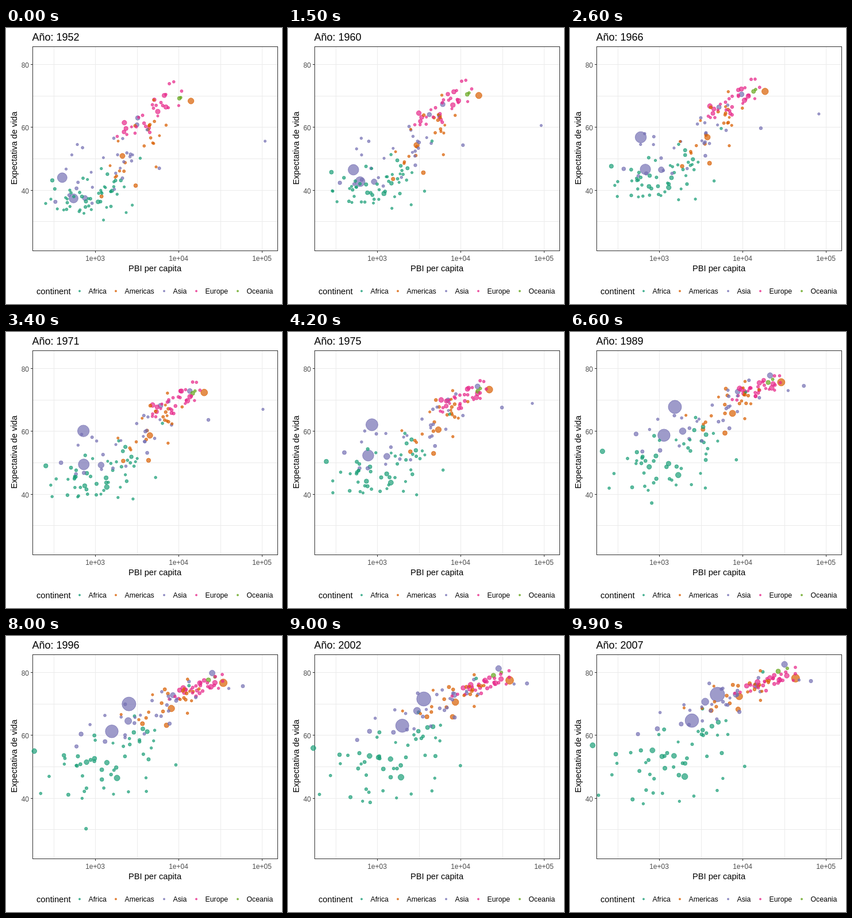
Recreate the animation shown at these times as an HTML page with a canvas. Size 480 by 480 pixels, loop 10 s.

```html
<!DOCTYPE html>
<html lang="es">
<head>
<meta charset="utf-8">
<title>PBI per capita y expectativa de vida</title>
<style>
html, body { margin: 0; width: 100%; height: 100%; overflow: hidden; background: #fff; }
svg, canvas { position: absolute; left: 0; top: 0; width: 480px; height: 480px; }
text { font-family: "Liberation Sans", Arial, sans-serif; font-size: 14.67px; }
.tick { font-size: 12px; fill: #4d4d4d; }
.key { font-size: 12.3px; }
</style>
</head>
<body>
<svg id="chart" viewBox="0 0 480 480">
  <text id="title" x="45.5" y="22" style="font-size:18px">Año: 1952</text>
  <text x="259" y="423" text-anchor="middle">PBI per capita</text>
  <text transform="translate(19 209) rotate(-90)" text-anchor="middle">Expectativa de vida</text>
  <text x="53" y="463">continent</text>
</svg>
<canvas id="dots" width="480" height="480"></canvas>
<script>
const LOOP = 10000, STEP = 100, STEPS_PER_SURVEY = 9, LAST = 11;
const ERAS = [0, 6, LAST]; // five-year surveys: 1952, 1982, 2007

// Each era: mean and spread of log10(PBI), mean life, years per decade of PBI, life noise.
const CONTINENTS = {
  Africa: { color: "#1b9e77", n: 50, growth: 3.9, keyX: 128,
    eras: [[2.97, 0.27, 39, 4, 4], [3.15, 0.36, 51.5, 9, 5], [3.2, 0.43, 54.5, 9, 7]] },
  Americas: { color: "#d95f02", n: 23, growth: 2.4, keyX: 191,
    eras: [[3.48, 0.22, 53, 24, 6], [3.78, 0.22, 66, 15, 4], [3.92, 0.28, 73.2, 9, 2.5]] },
  Asia: { color: "#7570b3", n: 27, growth: 2.7, keyX: 275,
    eras: [[3.15, 0.36, 46, 12, 7], [3.55, 0.5, 61, 13, 5], [3.75, 0.52, 70, 10, 3.2]] },
  Europe: { color: "#e7298a", n: 30, growth: 1.35, keyX: 331,
    eras: [[3.68, 0.24, 64.8, 20, 2.5], [4.15, 0.2, 72.8, 9, 1.4], [4.35, 0.24, 77.5, 9, 1]] },
  Oceania: { color: "#66a61e", n: 2, growth: 2.2, keyX: 403,
    eras: [[4.01, 0.01, 69.3, 0, 0.1], [4.27, 0.03, 74.2, 0, 0.4], [4.47, 0.07, 80.7, 0, 0.4]] }
};

// Dots that stand out: final population (millions) and points of [survey, PBI, life].
const LEADERS = [
  ["Asia", 1319, [[0, 400, 44], [1, 576, 50.5], [2, 488, 44.5], [3, 613, 58.4], [7, 1379, 67.3], [11, 4959, 73]]],
  ["Asia", 1110, [[0, 547, 37.4], [6, 856, 56.6], [11, 2452, 64.7]]],
  ["Asia", 224, [[0, 750, 37.5], [6, 1517, 56.2], [11, 3541, 70.7]]],
  ["Asia", 127, [[0, 3217, 63], [4, 14779, 73.4], [11, 31656, 82.6]]],
  ["Asia", 48, [[0, 331, 36.3], [6, 424, 58.1], [11, 944, 62.1]]],
  ["Asia", 2.5, [[0, 108382, 55.6], [3, 80895, 64.6], [4, 109348, 67.7], [6, 31354, 71.3], [11, 47307, 77.6]]],
  ["Americas", 301, [[0, 13990, 68.4], [6, 25010, 74.7], [11, 42952, 78.2]]],
  ["Americas", 190, [[0, 2109, 50.9], [6, 7031, 63.3], [11, 9066, 72.4]]],
  ["Africa", 135, [[0, 1077, 36.3], [6, 1577, 45.8], [11, 2014, 46.9]]],
  ["Africa", 9, [[0, 493, 40], [7, 848, 44], [8, 737, 23.6], [11, 863, 46.2]]]
];

const lerp = (a, b, k) => a + (b - a) * k;
const xOf = logGdp => 155.5 + 145 * (logGdp - 3);
const yOf = life => 63.5 + (80 - life) * 5.465;

let seed = 1952;
function rnd() {
  seed = (seed * 1664525 + 1013904223) % 4294967296;
  return seed / 4294967296;
}
const bell = () => 2 * (rnd() + rnd() + rnd() - 1.5);

const countries = [];
function add(area, pop, points) {
  const { color, growth } = CONTINENTS[area];
  countries.push({ color, p0: pop / growth, p1: pop, points });
}

for (const [area, pop, points] of LEADERS)
  add(area, pop, points.map(([s, gdp, life]) => ({ s, x: xOf(Math.log10(gdp)), y: yOf(life) })));

for (const area in CONTINENTS) {
  const { n, eras } = CONTINENTS[area];
  for (let i = 0; i < n; i++) {
    const wealth = bell(), health = bell();
    const points = eras.map(([mean, spread, life, slope, noise], e) => {
      const dx = spread * (0.95 * wealth + 0.3 * bell());
      const dy = slope * dx + noise * (0.95 * health + 0.3 * bell());
      return { s: ERAS[e], x: xOf(mean + dx), y: yOf(life + dy) };
    });
    add(area, 9 * Math.exp(1.1 * bell()), points);
  }
}
countries.sort((a, b) => b.p1 - a.p1);

const svg = document.getElementById("chart");
const title = document.getElementById("title");
function el(tag, attrs, text) {
  const e = document.createElementNS("http://www.w3.org/2000/svg", tag);
  for (const k in attrs) e.setAttribute(k, attrs[k]);
  if (text) e.textContent = text;
  svg.appendChild(e);
}
const line = (x1, y1, x2, y2, stroke) => el("line", { x1, y1, x2, y2, stroke, "stroke-width": 1 });
const gridX = i => Math.round(83 + i * 72.4) + 0.5;
const gridY = i => Math.round(63 + i * 54.65) + 0.5;

for (let i = 0; i < 6; i++) {
  line(gridX(i), 32, gridX(i), 387, "#ebebeb");
  line(46, gridY(i), 473, gridY(i), "#ebebeb");
}
for (let i = 0; i < 3; i++) {
  const x = gridX(2 * i + 1), y = gridY(2 * i);
  line(x, 388, x, 391, "#333");
  line(43, y, 46, y, "#333");
  el("text", { x: x - 0.5, y: 405, "text-anchor": "middle", class: "tick" }, "1e+0" + (3 + i));
  el("text", { x: 40, y: y + 5, "text-anchor": "end", class: "tick" }, 80 - 20 * i);
}
el("rect", { x: 46.5, y: 32.5, width: 426, height: 355, fill: "none", stroke: "#333" });

for (const name in CONTINENTS) {
  const { color, keyX } = CONTINENTS[name];
  el("circle", { cx: keyX, cy: 457.5, r: 1.6, fill: color, stroke: color, "stroke-width": 0.7, opacity: 0.85 });
  el("text", { x: keyX + 15.5, y: 462, class: "key" }, name);
}

const ctx = document.getElementById("dots").getContext("2d");
function draw(step) {
  const survey = step / STEPS_PER_SURVEY;
  title.textContent = "Año: " + Math.round(1952 + survey * 5);
  ctx.clearRect(0, 0, 480, 480);
  ctx.globalAlpha = 0.7;
  ctx.lineWidth = 1;
  for (const { color, p0, p1, points } of countries) {
    let i = 0;
    while (i < points.length - 2 && survey >= points[i + 1].s) i++;
    const a = points[i], b = points[i + 1];
    const k = (survey - a.s) / (b.s - a.s);
    const r = 1.8 + 0.3 * Math.sqrt(lerp(p0, p1, survey / LAST));
    ctx.beginPath();
    ctx.arc(lerp(a.x, b.x, k), lerp(a.y, b.y, k), r, 0, 2 * Math.PI);
    ctx.fillStyle = ctx.strokeStyle = color;
    ctx.fill();
    ctx.stroke();
  }
}

const start = performance.now();
function tick() {
  draw(Math.floor(((performance.now() - start) % LOOP) / STEP));
  requestAnimationFrame(tick);
}
tick();
</script>
</body>
</html>
```
